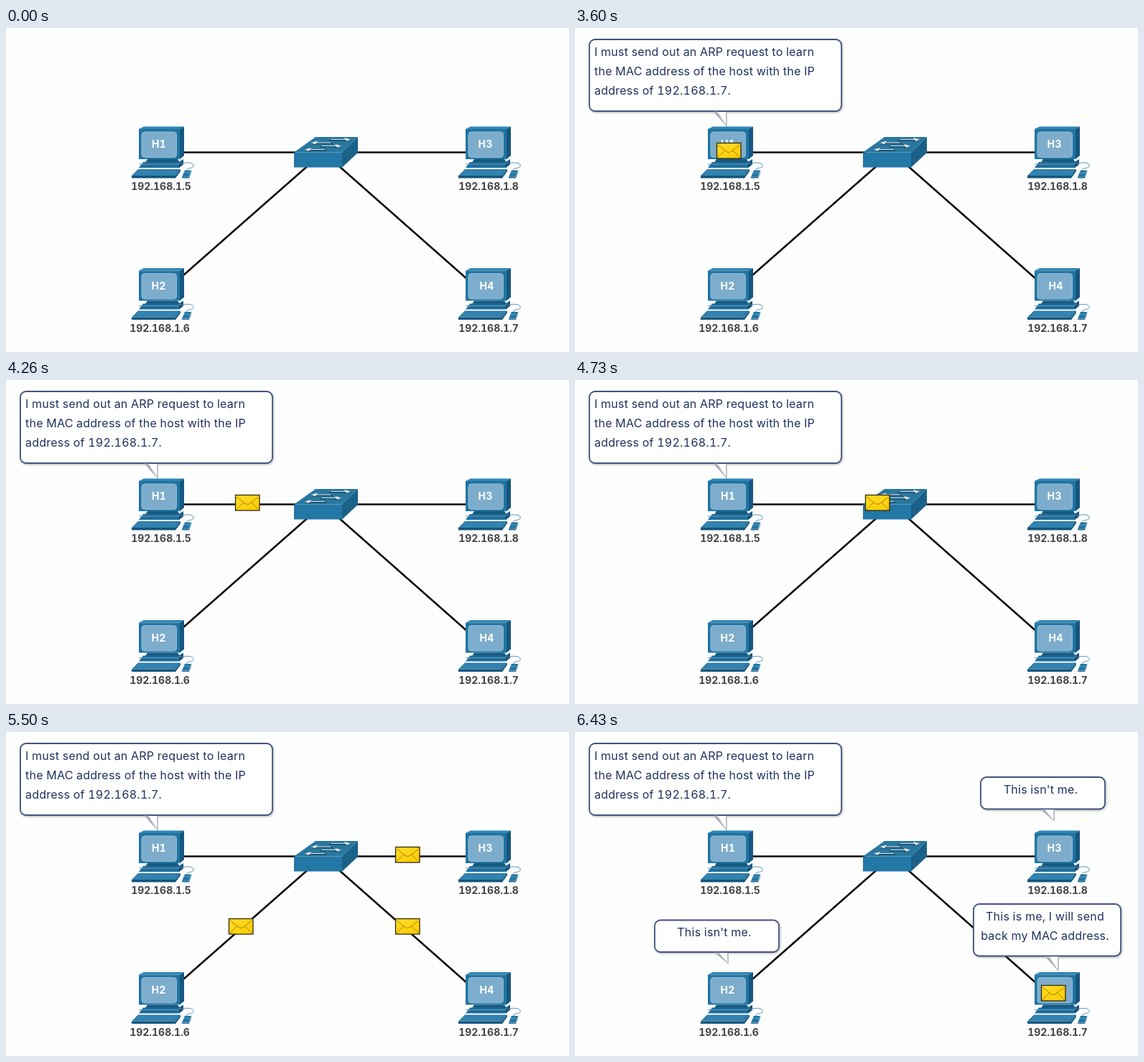
These frames come from a looping animation (784 px wide and 452 px high, 8 s). An HTML page:

```html
<!DOCTYPE html>
<html lang="en">
<head>
<meta charset="utf-8">
<title>ARP request</title>
<style>
  html, body { margin: 0; width: 100%; height: 100%; overflow: hidden; background: #fefefe; }
  svg { display: block; width: 784px; height: 452px; }
  text { font-family: Inter, "Open Sans", sans-serif; font-variant-numeric: tabular-nums; }
  .say { font-size: 16px; letter-spacing: .23px; fill: #1f3160; }
  .ip { font-size: 14px; font-weight: 700; fill: #444446; text-anchor: middle; }
  .host { font-size: 14px; font-weight: 700; letter-spacing: .2px; fill: #fff; text-anchor: middle; }
  .mid { text-anchor: middle; }
  .box { fill: #fff; stroke: #41547f; stroke-width: 1.8; }
</style>
</head>
<body>
<svg viewBox="0 0 784 452">
  <defs>
    <linearGradient id="gold" x1="0" y1="0" x2="1" y2="1">
      <stop offset="0" stop-color="#ffdc28"/>
      <stop offset="1" stop-color="#ffcb00"/>
    </linearGradient>
    <filter id="soft" x="-10%" y="-20%" width="120%" height="140%">
      <feDropShadow dx=".8" dy="1" stdDeviation="1.4" flood-color="#555" flood-opacity=".5"/>
    </filter>

    <g id="pc">
      <path d="M197 183H239L243 189H193Z" fill="#17587f"/>
      <path d="M191 187H240L247 183V190L241 195H185Z" fill="#1f6d9b"/>
      <path d="M185 190H240L247 185" fill="none" stroke="#5f9abd"/>
      <path d="M241 195L247 190V184L241 190Z" fill="#134a6c"/>
      <path d="M185 141L192 137.500H248L242 141Z" fill="#2f86b5"/>
      <path d="M242 141L248 137.500V178L242 183Z" fill="#15577f"/>
      <path d="M185 141H242V183H185Z" fill="#2175a3"/>
      <rect x="189" y="145" width="48.500" height="35.500" rx="4" fill="#7dadcc" stroke="#92bad3"/>
      <path d="M184 197H243L236 206H175Z" fill="#2a7dab"/>
      <path d="M175 206H236L243 197V200L236 209.500H175Z" fill="#15557b"/>
      <path d="M185 199.500H237M182 202H235M179 204.500H232" stroke="#4a8fb6" stroke-width=".8"/>
      <path d="M243 190C252 186 263 188 261 193C259 197 250 194 252 199" fill="none" stroke="#5b95b6"/>
      <path d="M249 198.500H258L255 208H245Z" fill="#2376a4"/>
      <path d="M245 208H255L258 198.500V201L255 209.500H245ZM248 202H257" fill="#15557b" stroke="#8ab8d1" stroke-width=".6"/>
    </g>

    <g id="arrow">
      <path d="M0 0L8 -2.500V-.7H29V.8H7L6 2.500Z" fill="#144666" transform="translate(1 1.200)"/>
      <path d="M0 0L9 -2.500L8 -.6H28L27 .6H7L6 2.500Z" fill="#e3e6e4"/>
    </g>

    <g id="mail">
      <rect x=".5" y=".5" width="33.500" height="21.500" fill="url(#gold)" stroke="#33290f" stroke-width="1.300"/>
      <path d="M1.500 21L12 10.500M33 21L22.500 10.500" stroke="#a07800" stroke-width=".9" fill="none"/>
      <path d="M2 3L14 12.500Q17.250 14.500 20.500 12.500L32.500 3" stroke="#a07800" stroke-width=".9" fill="none"/>
    </g>
  </defs>

  <rect width="784" height="452" fill="#fefefe"/>
  <path d="M246 173.500H404M488 173.500H642M245 346.700L422 190.700M463 192L643 351" stroke="#0b0b0b" stroke-width="2.600" fill="none"/>

  <g id="switch">
    <path d="M401 173.500L431 152H490L468 173.500Z" fill="#2a789f"/>
    <path d="M468 173.500L490 152V174L468 194.500Z" fill="#1a618a"/>
    <path d="M401 173.500H468V194.500H401Z" fill="#2277a6"/>
    <use href="#arrow" transform="translate(480 155.500) scale(-1 1)"/>
    <use href="#arrow" transform="translate(425 160)"/>
    <use href="#arrow" transform="translate(467 164.500) scale(-1 1)"/>
    <use href="#arrow" transform="translate(416 169.500)"/>
  </g>

  <g id="hosts"></g>
  <g id="ask"></g>
  <g id="replies"></g>
  <g id="mails"></g>
</svg>

<script>
const $ = id => document.getElementById(id);
const LOOP = 8000, ASK = 1100, SEND = 3600, LEG = 1250, FPS = 30;

// name, dx, dy, label x, address x, address
const hosts = [
  ['H1', 0, 0, 213, 216, '192.168.1.5'],
  ['H2', 0, 197.5, 212.5, 214, '192.168.1.6'],
  ['H3', 455, 0, 667.5, 672, '192.168.1.8'],
  ['H4', 455, 197.5, 669.5, 672, '192.168.1.7']
];

$('hosts').innerHTML = hosts.map(([name, dx, dy, nx, ax, ip]) => `
  <use href="#pc" x="${dx}" y="${dy}"/>
  <text class="host" x="${nx}" y="${167 + dy}">${name}</text>
  <text class="ip" x="${ax}" y="${226.3 + dy}">${ip}</text>`).join('');

function bubble(x, y, w, h, tipX, tipY, lines, textX, textY, cls = 'mid') {
  const base = y + h + 1;
  const rows = lines.map((s, i) =>
    `<text class="say ${cls}" x="${textX}" y="${textY + i * 27}">${s}</text>`).join('');
  return `
    <rect class="box" x="${x}" y="${y}" width="${w}" height="${h}" rx="8" filter="url(#soft)"/>
    <path d="M${tipX - 19} ${base}L${tipX - 1} ${tipY}V${base}Z" fill="#fff"/>
    <path d="M${tipX - 19} ${base}L${tipX - 1} ${tipY}L${tipX - 14} ${base}Z" fill="#a9adb4" stroke="#b9bcc2" stroke-width=".8"/>
    <path d="M${tipX - 1} ${tipY}V${base}" stroke="#b0b4bb" stroke-width="1.6"/>
    ${rows}`;
}

$('ask').innerHTML = bubble(20, 16, 351, 100, 212, 137, [
  'I must send out an ARP request to learn',
  'the MAC address of the host with the IP',
  'address of 192.168.1.7.'
], 27, 39, '');

$('replies').innerHTML =
  bubble(565, 63, 173, 44.5, 668, 124, ["This isn't me."], 648.5, 86) +
  bubble(111, 262.5, 173, 44.5, 214, 323, ["This isn't me."], 194, 285) +
  bubble(555, 240, 205, 72.5, 674, 333, ['This is me, I will send', 'back my MAC address.'], 654.5, 263);

const start = [197, 160], hub = [425.5, 160];
const ends = [[649, 353], [649, 160], [204, 353]];
const mails = ends.map(() => {
  const el = document.createElementNS('http://www.w3.org/2000/svg', 'use');
  el.setAttribute('href', '#mail');
  $('mails').append(el);
  return el;
});

const show = (el, on) => el.setAttribute('visibility', on ? 'visible' : 'hidden');

function place(el, a, b, p) {
  const [x, y] = a.map((v, i) => Math.round(v + (b[i] - v) * p));
  el.setAttribute('transform', `translate(${x} ${y})`);
}

function render(t) {
  // The packets advance in 1/30 s steps.
  const run = Math.floor((t - SEND + 7) * FPS / 1000) * 1000 / FPS;
  const sent = t >= SEND, split = run >= LEG, done = run > 2 * LEG + 1;
  show($('ask'), t >= ASK);
  show($('replies'), done);
  mails.forEach((el, i) => {
    show(el, sent && (i === 0 || split && !done));
    if (split) place(el, hub, ends[i], Math.min(1, run / LEG - 1));
    else place(el, start, hub, Math.max(0, run / LEG));
  });
}

const t0 = performance.now();
function tick() {
  render((performance.now() - t0) % LOOP);
  requestAnimationFrame(tick);
}
tick();
</script>
</body>
</html>
```
